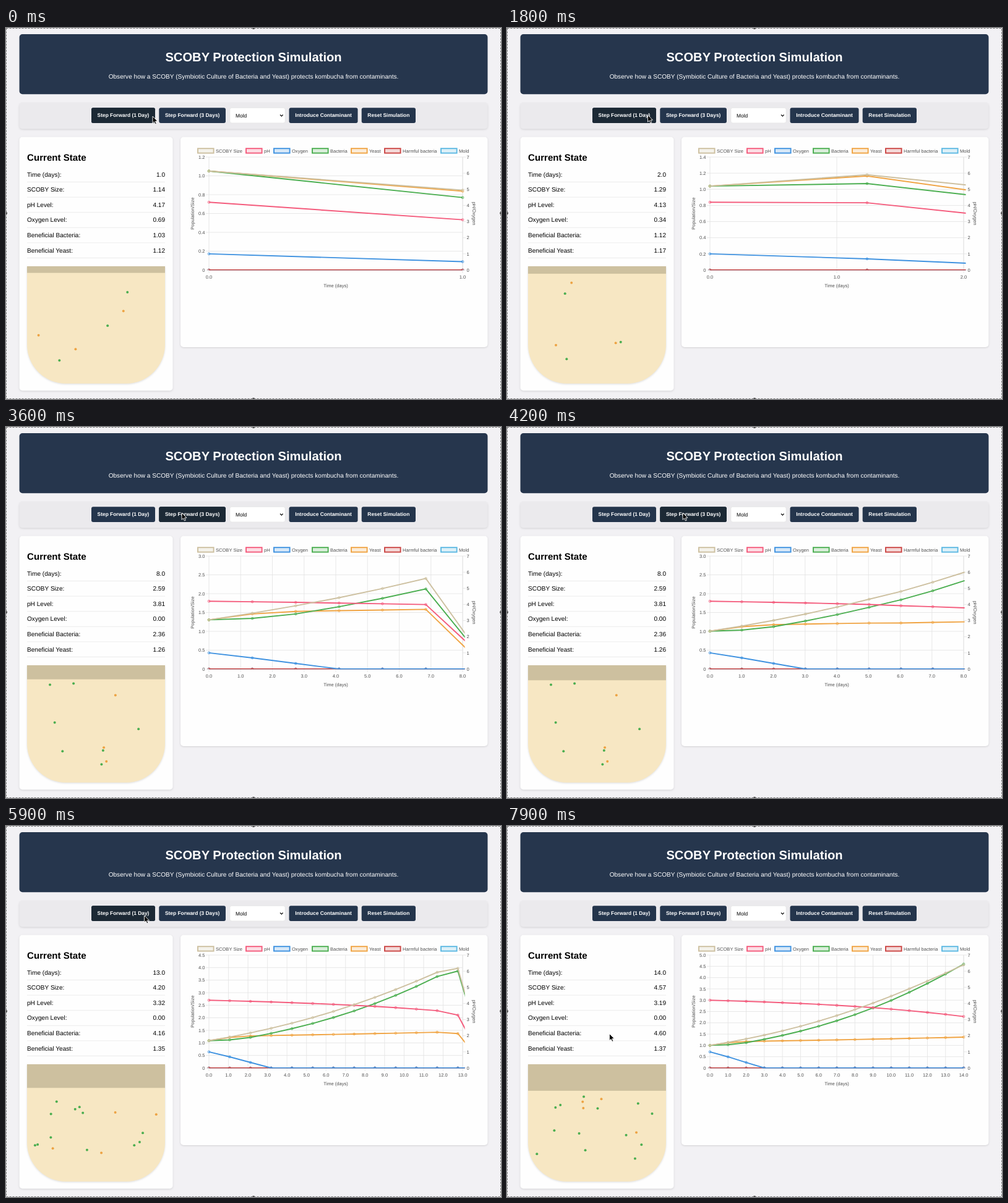
Write an HTML page that moves like this. It is 800 by 601 pixels and loops after 8000 ms.

```html
<!DOCTYPE html>
<html lang="en">
<head>
<meta charset="utf-8">
<title>SCOBY Protection Simulation</title>
<style>
html, body { margin: 0; width: 100%; height: 100%; overflow: hidden; background: #f2f1f4; }
svg { display: block; width: 800px; height: 601px; }
text { font-family: "Liberation Sans", Arial, sans-serif; text-rendering: geometricPrecision; }
.card { filter: drop-shadow(0 1.2px 1.6px rgba(0,0,0,.13)); }
</style>
</head>
<body>
<svg viewBox="0 0 800 601">
  <g id="page"></g>
  <g id="live"></g>
  <path id="cursor" d="M0 0V11.2L2.6 8.8L4.4 12.8L6.3 12L4.5 8.1H8Z" fill="#000" stroke="#fff" stroke-width=".9"/>
  <rect x=".5" y=".5" width="799" height="600" fill="none" stroke="#777" stroke-dasharray="3 2"/>
  <path d="M398.5 0h3v2h-3zM398.5 599h3v2h-3zM0 298.5h2v3h-2zM798 298.5h2v3h-2z" fill="#555"/>
</svg>
<script>
const LOOP = 8000, SMALL = 7.56, BODY = 10.08, ROW = 24.6, GREY = '#505050';
const LEFT = 328, RIGHT = 738, TOP = 209, BASE = 392, WIDTH = RIGHT - LEFT, HEIGHT = BASE - TOP;

// The culture, one entry per day: oxygen feeds the yeast and holds back the bacteria.
const days = [{ scoby: 1, ph: 4.2, oxygen: 1, bacteria: 1, yeast: 1, none: 0 }];
while (days.length < 15) {
  const { scoby: s, ph, oxygen: o, bacteria: b, yeast: y } = days.at(-1);
  days.push({
    scoby: s + s * (.1502 - .0151 * s),
    ph: ph - .0312 * b - .0037,
    oxygen: Math.max(0, o - .31 * y),
    bacteria: b + b * (.137 - .00182 * b * b) * Math.min(1, 1.6 - 1.38 * o),
    yeast: y + y * (.009 + .0015 * b + .1095 * o ** 3),
    none: 0
  });
}

// label, colour, value, legend x
const series = [
  ['SCOBY Size', '#cdc0a0', 'scoby', 310],
  ['pH', '#f45b7c', 'ph', 388],
  ['Oxygen', '#3f92e0', 'oxygen', 433],
  ['Bacteria', '#4bae50', 'bacteria', 495],
  ['Yeast', '#f0a443', 'yeast', 558],
  ['Harmful bacteria', '#cb4644', 'none', 612],
  ['Mold', '#5cb8e2', 'none', 703]
];

// day reached and the moment of the click
const steps = [[0, -9000], [1, -290], [2, 1500], [5, 2699], [8, 3484], [11, 4245], [12, 5330], [13, 5815], [14, 6700]]
  .map(([day, start]) => {
    const top = Math.max(days[day].scoby, days[day].bacteria);
    const tick = [.1, .2, .5].find(size => top / size <= 10);
    return { day, start, tick, max: Math.ceil(top / tick) * tick };
  });

// pointer stops: time, x, y
const path = [[0, 237, 143], [900, 227.5, 141], [2200, 227.5, 141], [2500, 262, 142], [2690, 284, 139],
  [4700, 284, 139], [5100, 223.5, 145], [7000, 223.5, 145], [7700, 165.5, 336.5], [LOOP, 165.5, 336.5]];

// label, x, width, times under the pointer
const buttons = [
  ['Step Forward (1 Day)', 138, 103, [[-999, 2320], [4980, 7040]]],
  ['Step Forward (3 Days)', 247.3, 107.7, [[2480, 4870]]],
  ['Introduce Contaminant', 457.5, 111, []],
  ['Reset Simulation', 574.7, 87.3, []]
];

const clamp = v => Math.min(1, Math.max(0, v));
const mix = (a, b, p) => a + (b - a) * p;
const text = (s, x, y, size = SMALL, fill = GREY, anchor = 'start', extra = '') =>
  `<text x="${x}" y="${y + size * .355}" font-size="${size}" fill="${fill}" text-anchor="${anchor}" ${extra}>${s}</text>`;
const rect = (x, y, w, h, fill, r = 0, extra = '') =>
  `<rect x="${x}" y="${y}" width="${w}" height="${h}" rx="${r}" fill="${fill}" ${extra}/>`;
const line = (x1, y1, x2, y2, stroke = '#e2e2e2') =>
  `<path d="M${x1} ${y1}L${x2} ${y2}" stroke="${stroke}" stroke-width=".8"/>`;
const dot = (x, y, r, fill, extra = '') => `<circle cx="${x}" cy="${y}" r="${r}" fill="${fill}" ${extra}/>`;
const BOLD = 'font-weight="bold"', CARD = 'class="card"';

function drawPage() {
  let s = rect(21.6, 10, 756.8, 97.2, '#26364d', 5) +
    text('SCOBY Protection Simulation', 400, 47, 20.16, '#fff', 'middle', BOLD) +
    text('Observe how a SCOBY (Symbiotic Culture of Bacteria and Yeast) protects kombucha from contaminants.',
      400, 78.3, BODY, '#fff', 'middle') +
    rect(21.6, 121, 756.8, 42.5, '#ebeaed', 5, CARD) +
    rect(21.6, 176.5, 248, 411, '#fefefe', 5, CARD) +
    rect(282, 176.5, 496.4, 340.5, '#fefefe', 5, CARD) +
    rect(361.8, 129.3, 89.4, 24.6, '#fff', 3, 'stroke="#ddd" stroke-width=".6"') +
    text('Mold', 371, 141.7, 8.4, '#000') +
    '<path d="M443 140.5l2.3 2.4l2.3-2.4" fill="none" stroke="#111" stroke-width="1.3"/>' +
    text('Current State', 34, 210, 15.12, '#000', 'start', BOLD) +
    `<path ${CARD} d="M34 386H257V513A63 63 0 0 1 194 576H97A63 63 0 0 1 34 513Z" fill="#f7e7c3"/>`;
  ['Time (days):', 'SCOBY Size:', 'pH Level:', 'Oxygen Level:', 'Beneficial Bacteria:', 'Beneficial Yeast:']
    .forEach((label, i) => s += text(label, 34, 237 + i * ROW, BODY, '#000') +
      line(34, 249.5 + i * ROW, 257, 249.5 + i * ROW, '#e8e8e8'));
  for (const [label, color, , x] of series)
    s += rect(x, 195.2, 25.6, 7.4, color, 0, `fill-opacity=".2" stroke="${color}" stroke-width="1.9"`) +
      text(label, x + 29, 199);
  s += text('Time (days)', 533, 417, SMALL, GREY, 'middle') +
    text('Population/Size', 0, 0, SMALL, GREY, 'middle', 'transform="translate(301.5 300.5) rotate(-90)"') +
    text('pH/Oxygen', 0, 0, SMALL, GREY, 'middle', 'transform="translate(757 300.5) rotate(90)"');
  for (let v = 0; v <= 7; v++) {
    const y = BASE - v * HEIGHT / 7;
    s += line(RIGHT, y, RIGHT + 5, y) + text(v, 744.5, y);
  }
  page.innerHTML = s + `<clipPath id="area">${rect(LEFT - 3, TOP - 3, WIDTH + 6.5, HEIGHT + 3.4, '#000')}</clipPath>`;
}

const slotX = (k, i) => LEFT + i * WIDTH / Math.max(1, steps[k].day);

// Each click eases every point from wherever it was; new points rise from the base line.
function pointAt(k, key, i, t) {
  const step = steps[k], max = key === 'ph' || key === 'oxygen' ? 7 : step.max;
  const goal = [slotX(k, i), BASE - HEIGHT * days[i][key] / max];
  const p = 1 - (1 - clamp((t - step.start) / 1000)) ** 4;
  if (!k || p === 1) return goal;
  const from = i <= steps[k - 1].day ? pointAt(k - 1, key, i, step.start) : [slotX(k - 1, i), BASE];
  return goal.map((v, axis) => mix(from[axis], v, p));
}

function drawChart(k, t) {
  const { day, tick, max } = steps[k];
  let s = line(RIGHT, TOP, RIGHT, BASE);
  for (let i = 0; i <= day; i++) {
    const x = slotX(k, i);
    s += line(x, TOP, x, BASE + 5) + text(i.toFixed(1), x, 403.5, SMALL, GREY, 'middle');
  }
  for (let i = 0; i <= Math.round(max / tick); i++) {
    const y = BASE - HEIGHT * i * tick / max;
    s += line(LEFT - 5, y, RIGHT, y) + text(i ? (i * tick).toFixed(1) : 0, 321.5, y, SMALL, GREY, 'end');
  }
  s += '<g clip-path="url(#area)">';
  for (const [, color, key] of [...series].reverse()) {
    const points = Array.from({ length: day + 1 }, (_, i) => pointAt(k, key, i, t));
    s += `<polyline points="${points.join(' ')}" fill="none" stroke="${color}" stroke-width="1.9"/>`;
    for (const [x, y] of points)
      if (x <= RIGHT + 1) s += dot(x, y, 1.9, color, `fill-opacity=".2" stroke="${color}" stroke-width=".7"`);
  }
  return s + '</g>';
}

// Three microbes per unit of population, scattered anew each day.
function drawMicrobes({ bacteria, yeast, scoby }, day) {
  let seed = 7919 * (day + 3), s = '';
  const random = () => (seed = seed * 16807 % 2147483647) / 2147483647;
  const greens = Math.floor(bacteria * 3), total = greens + Math.floor(yeast * 3), top = 390 + 9.4 * scoby;
  random();
  for (let i = 0; i < total; i++)
    s += dot(mix(46, 246, random()), mix(top, 548, random()), 2, i < greens ? '#4bae50' : '#eda343');
  return s;
}

function drawState(k, t) {
  const { day, start } = steps[k], now = days[day];
  const grow = 1 - (1 - clamp((t - start) / 300)) ** 3;
  let s = rect(34, 386, 223, 9.4 * mix(days[steps[k - 1].day].scoby, now.scoby, grow), '#cdc09f');
  [day.toFixed(1), ...['scoby', 'ph', 'oxygen', 'bacteria', 'yeast'].map(key => now[key].toFixed(2))]
    .forEach((v, i) => s += text(v, 257, 237 + i * ROW, BODY, '#000', 'end'));
  return s + drawMicrobes(now, day);
}

function drawButtons(t) {
  return buttons.map(([label, x, w, spans]) => {
    const hover = Math.max(0, ...spans.map(([a, b]) => Math.min(clamp((t - a) / 300), 1 - clamp((t - b) / 300))));
    return rect(x, 129.2, w, 24.8, '#24354c', 3) +
      rect(x, 129.2, w, 24.8, '#1c2935', 3, `opacity="${hover}"`) +
      text(label, x + w / 2, 141.5, 8.4, '#fff', 'middle', BOLD);
  }).join('');
}

function frame() {
  const t = (performance.now() - origin) % LOOP;
  const k = steps.findLastIndex(s => s.start <= t);
  live.innerHTML = drawButtons(t) + drawState(k, t) + drawChart(k, t);
  const n = path.findIndex(stop => stop[0] > t), [t0, x0, y0] = path[n - 1], [t1, x1, y1] = path[n];
  const p = (t - t0) / (t1 - t0);
  cursor.setAttribute('transform', `translate(${mix(x0, x1, p)} ${mix(y0, y1, p)})`);
  requestAnimationFrame(frame);
}

const [page, live, cursor] = ['page', 'live', 'cursor'].map(id => document.getElementById(id));
const origin = performance.now();
drawPage();
frame();
</script>
</body>
</html>
```
